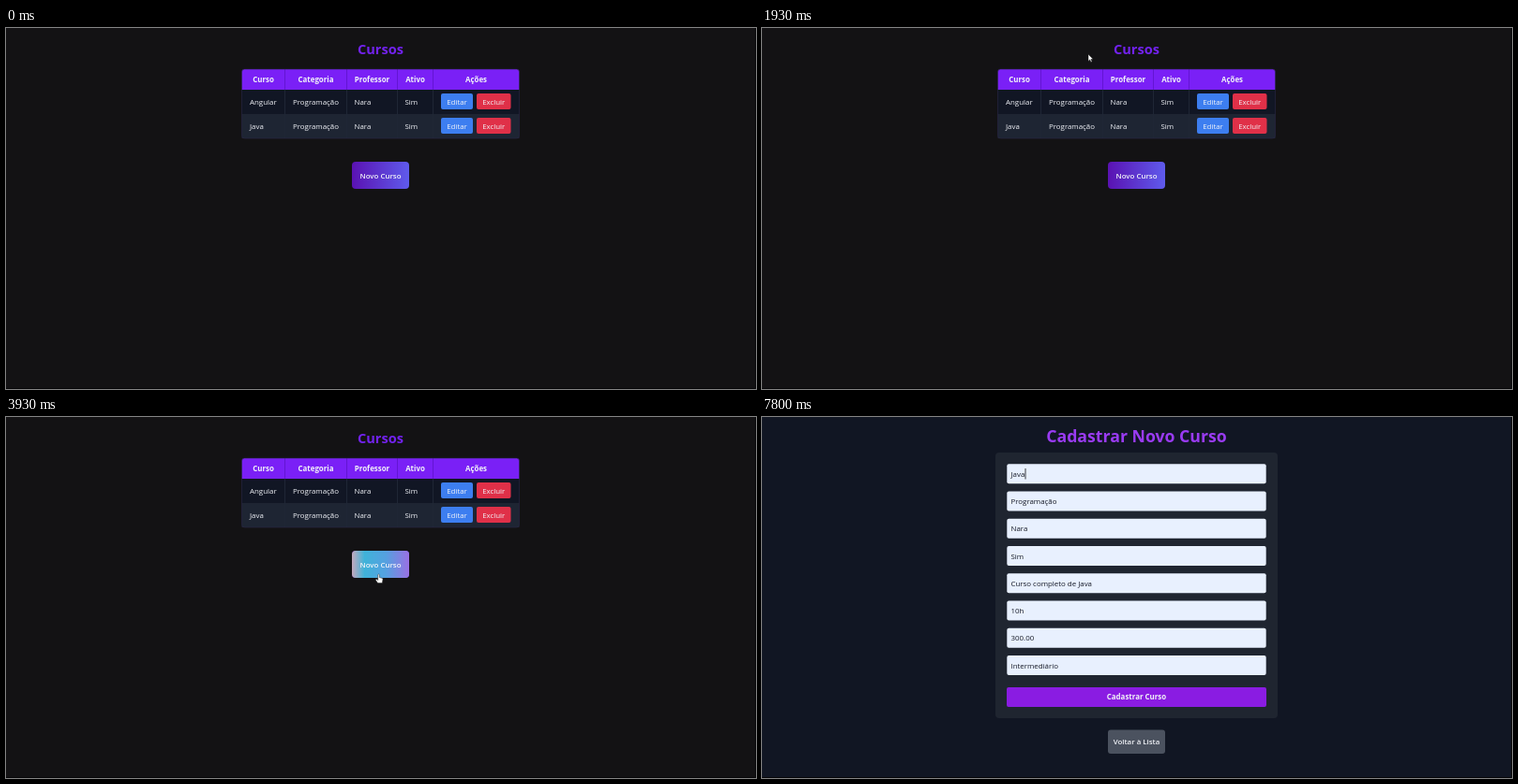
Animation of 800 by 386 pixels, one loop 8000 ms. Source, as an HTML page:

```html
<!DOCTYPE html>
<html lang="pt-BR">
<head>
<meta charset="utf-8">
<title>Cursos</title>
<style>
  html, body { margin: 0; width: 100%; height: 100%; overflow: hidden; background: #131214; }
  svg { display: block; width: 100%; height: 100%; }
  text { font: 400 7.9px "Open Sans", "Noto Sans", sans-serif; fill: #f1f3f8; }
  .bold { font-weight: 700; }
  .semi { font-weight: 600; }
  .mid { text-anchor: middle; }
  .hint { fill: #9ca3af; }
  .value { fill: #161a26; }
</style>
</head>
<body>
<svg id="stage" viewBox="0 0 800 386">
  <defs>
    <linearGradient id="idle">
      <stop offset="0" stop-color="#5a12b2"/>
      <stop offset="1" stop-color="#5f5bec"/>
    </linearGradient>
    <linearGradient id="hover">
      <stop offset="0" stop-color="#c3a9bd"/>
      <stop offset=".22" stop-color="#3fb3d9"/>
      <stop offset=".6" stop-color="#56a0e0"/>
      <stop offset="1" stop-color="#9a70e4"/>
    </linearGradient>
  </defs>
  <g id="list"></g>
  <g id="form"></g>
  <path d="M799.5 0V385.5H0" fill="none" stroke="#050507"/>
  <path id="arrow" d="M0 0V7.4L1.7 5.9 2.9 8.6 4.1 8.1 2.9 5.5 5.1 5.3Z" fill="#fff" stroke="#111" stroke-width=".5"/>
  <path id="hand" d="M-.8 .6Q0-.5 .8 .6V3.6L3.6 4.3Q4.6 4.6 4.5 5.6L3.8 9.6H-.9L-3.1 6.4Q-3.2 5.2-2.1 5.4L-.8 6.5Z" fill="#fff" stroke="#222" stroke-width=".5"/>
</svg>
<script>
const LOOP = 8000, PAGE_CHANGE = 4200, AUTOFILL = 6630, ACCEPT = 7600;
const $ = id => document.getElementById(id);

function add(parent, tag, attrs, label) {
  const node = document.createElementNS("http://www.w3.org/2000/svg", tag);
  for (const key in attrs) node.setAttribute(key, attrs[key]);
  if (label) node.textContent = label;
  return parent.appendChild(node);
}
const box = (parent, x, y, width, height, fill, rx = 0, more = {}) =>
  add(parent, "rect", { x, y, width, height, fill, rx, ...more });
const write = (parent, label, x, y, cls = "", style = "") =>
  add(parent, "text", { x, y, class: cls, style }, label);

// Course list page
const list = $("list");
box(list, 0, 0, 800, 386, "#131214");
write(list, "Cursos", 399.5, 28, "bold mid", "font-size:14.6px;fill:#7222ee");
add(list, "path", { d: "M251.5 66V47Q251.5 44 254.5 44H544.5Q547.5 44 547.5 47V66Z", fill: "#7a20f6" });
box(list, 251.5, 66, 296, 26, "#111624");
box(list, 251.5, 92, 296, 26, "#1e2533");
[297.5, 363.5, 417.5, 455.5].forEach(x => {
  box(list, x - .5, 44, 1, 22, "#6315d2");
  box(list, x - .5, 66, 1, 52, "#1f2635");
});
box(list, 251.5, 44, 296, 74, "none", 3, { stroke: "#2a2748", "stroke-width": .6 });

[["Curso", 274.5], ["Categoria", 330.5], ["Professor", 390.5], ["Ativo", 436.5], ["Ações", 501.5]]
  .forEach(([label, x]) => write(list, label, x, 58.2, "bold mid"));

["Angular", "Java"].forEach((course, row) => {
  const y = 82 + row * 26;
  [[course, 260], ["Programação", 306], ["Nara", 371.5], ["Sim", 425.5]]
    .forEach(([label, x]) => write(list, label, x, y));
  [["Editar", 464, 34, "#3d7ef0"], ["Excluir", 502, 36.5, "#e03048"]].forEach(([label, x, w, color]) => {
    box(list, x, y - 12, w, 17, color, 2);
    write(list, label, x + w / 2, y, "mid");
  });
});

box(list, 369, 143, 61, 29, "url(#idle)", 4);
const glow = box(list, 369, 143, 61, 29, "url(#hover)", 4);
write(list, "Novo Curso", 399.5, 160.8, "semi mid");

// Registration page
const form = $("form");
box(form, 0, 0, 800, 386, "#111623");
write(form, "Cadastrar Novo Curso", 399.5, 26.5, "bold mid", "font-size:17.7px;fill:#9a3bf2");
box(form, 249, 38, 301, 284, "#1f2530", 4);

const fields = [
  ["Nome do curso", "Java"],
  ["Categoria", "Programação"],
  ["Professor", "Nara"],
  ["Status", "Sim"],
  ["Descrição", "Curso completo de Java"],
  ["Duração (ex: 10h)", "10h"],
  ["Valor (ex: 1000.00)", "300.00"],
  ["Nível (Iniciante|Intermediário|Avançado)", "Intermediário"]
];
const empty = add(form, "g", {}), filled = add(form, "g", {});
fields.forEach(([hint, value], i) => {
  const y = 50.2 + i * 29.25;
  box(empty, 261.5, y + .3, 276, 20.4, "#383e4e", 2, { stroke: "#474e5d", "stroke-width": .6 });
  write(empty, hint, 265.5, y + 13.7, "hint");
  box(filled, 261.3, y, 276.4, 21, "#e8f0fe", 2);
  write(filled, value, 265.5, y + 13.7, "value");
});
const caret = box(form, 265.4, 55, .8, 11.5, "#fff");

box(form, 261, 289, 277, 21, "#8a1ce2", 2);
write(form, "Cadastrar Curso", 399.5, 302.4, "bold mid");
box(form, 369, 334.5, 61, 25.5, "#4b525f", 3);
write(form, "Voltar à Lista", 399.5, 350.3, "semi mid");

// Pointer stops: time, x, y
const stops = [
  [30, 560, 262], [450, 400, 150], [830, 225, 56], [1130, 189, 38], [1400, 200, 36],
  [1700, 272, 28], [1930, 348, 28], [2200, 430, 44], [2500, 500, 66], [2970, 485, 91],
  [3350, 468, 122], [3700, 404, 160], [3930, 397.5, 168], [4170, 397.5, 165],
  [4830, 397.5, 165], [5030, 320, 72.5], [5300, 320, 72.5]
];
const ease = p => p * p * (3 - 2 * p);
const clamp = v => Math.max(0, Math.min(1, v));

function pointerAt(t) {
  const next = stops.findIndex(s => s[0] > t);
  if (next < 1) return null;
  const [t0, x0, y0] = stops[next - 1], [t1, x1, y1] = stops[next];
  const p = ease((t - t0) / (t1 - t0));
  return [x0 + (x1 - x0) * p, y0 + (y1 - y0) * p];
}
const show = (node, on) => node.setAttribute("visibility", on ? "inherit" : "hidden");

function caretOn(t) {
  if (t >= ACCEPT) return true;
  if (t < 5030) return false;
  return t < 5800 || Math.floor((t - 5800) / 533) % 2 === 1;
}

function render(t) {
  show(list, t < PAGE_CHANGE);
  show(form, t >= PAGE_CHANGE);
  show(empty, t < AUTOFILL);
  show(filled, t >= AUTOFILL);
  glow.setAttribute("opacity", clamp((t - 3620) / 280));

  show(caret, caretOn(t));
  caret.setAttribute("x", t < ACCEPT ? 265.4 : 280.6);
  caret.setAttribute("fill", t < AUTOFILL ? "#fff" : "#111");

  const point = pointerAt(t), linking = t >= 3640 && t < 4830;
  show($("arrow"), point && !linking);
  show($("hand"), point && linking);
  if (point) $(linking ? "hand" : "arrow").setAttribute("transform", `translate(${point})`);
}

const start = performance.now();
function tick() {
  render((performance.now() - start) % LOOP);
  requestAnimationFrame(tick);
}
tick();
</script>
</body>
</html>
```
